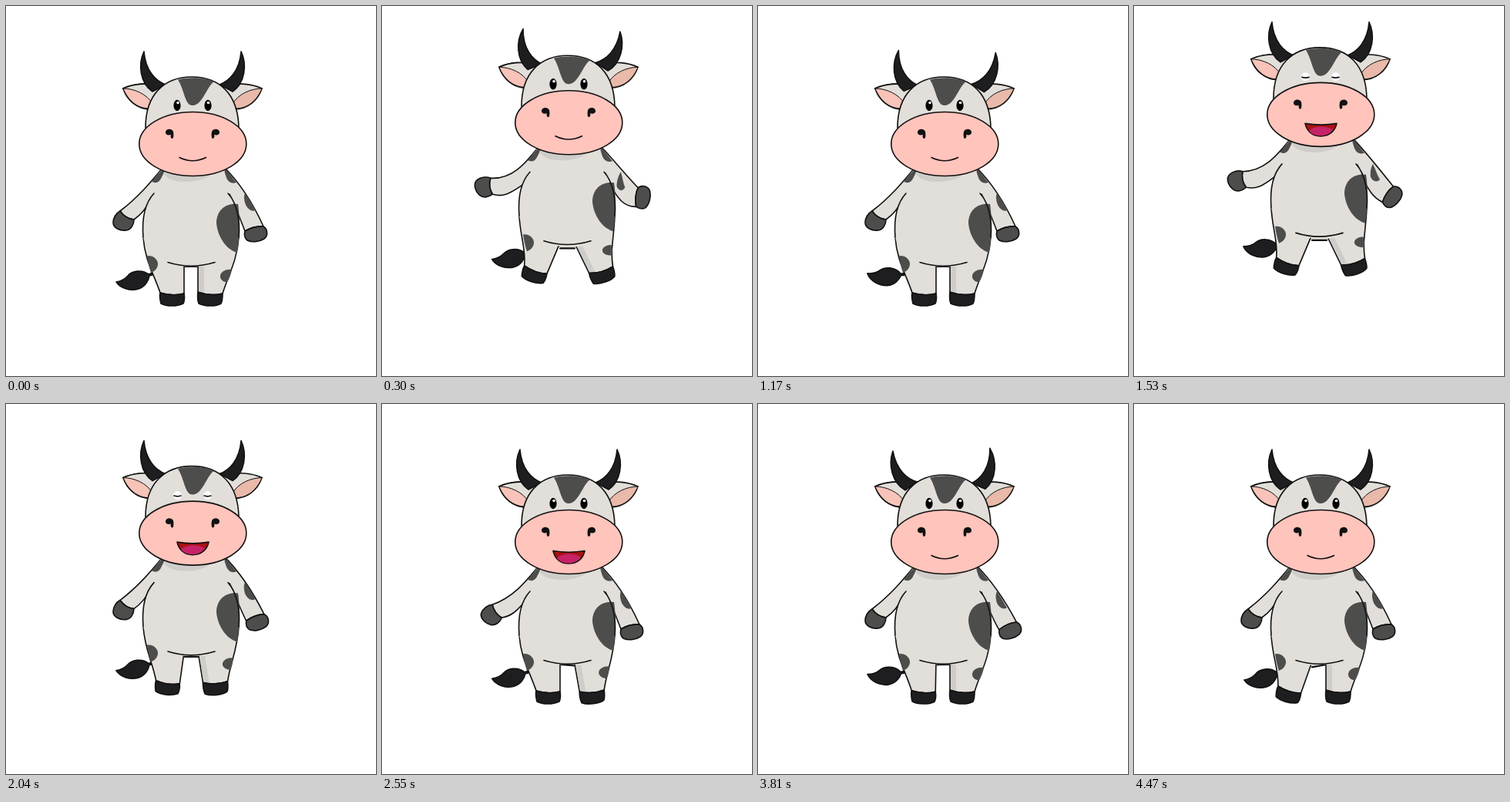
These frames come from a looping animation (480x480 px, 4500 ms). An HTML page:

```html
<!DOCTYPE html>
<html lang="en">
<head>
<meta charset="utf-8">
<title>Happy cow</title>
<style>
html, body { margin: 0; width: 100%; height: 100%; overflow: hidden; background: #fff; }
svg { display: block; width: 100vw; height: 100vh; }
.ln { stroke: #111; stroke-width: 1.6; stroke-linecap: round; stroke-linejoin: round; }
.skin { fill: #e2deda; }
.spot { fill: #4d4d4c; }
.hoof { fill: #1e1e20; }
.pink { fill: #ffc4bb; }
.shade { fill: #cfcdc9; }
.no { fill: none; }
</style>
</head>
<body>
<svg viewBox="0 0 480 480">
  <g id="cow">
    <path id="tail" class="hoof ln" d="M190 346L185 348C176 341 163 344 158 350C154 355 149 357 143 358C149 367 162 370 172 367C181 364 185 356 186 350L190 349Z"/>
    <g id="armL">
      <path class="skin ln" d="M205 208C190 226 172 248 148 266Q155 276 166 277C176 270 180 265 192 244"/>
      <path class="spot ln" d="M148 266C142 269 139 276 139 281C139 288 148 292 156 291C162 290 166 284 166 277Q155 276 148 266Z"/>
    </g>
    <g id="armR">
      <path class="skin ln" d="M282 208C298 224 316 246 334 286Q322 285 310 292C306 282 303 272 290 244"/>
      <path class="spot" d="M310 243C316 251 320 258 324 265C318 268 313 262 311 258C309 253 308 247 310 243Z"/>
      <path class="spot ln" d="M334 286C340 290 340 298 335 302C329 306 319 307 313 304C309 301 309 296 310 292Q322 285 334 286Z"/>
    </g>
    <path id="crotch" class="skin"/>
    <path id="seam" class="ln no" style="stroke-width:2.2"/>
    <g id="legL">
      <path class="skin ln" d="M178 300C180 330 192 348 200 372Q216 377 231 373L231 338"/>
      <path class="hoof ln" d="M200 372Q216 377 231 373C232 379 231 384 230 386C222 390 208 390 201 386C200 382 199 376 200 372Z"/>
    </g>
    <g id="legR">
      <path class="skin ln" d="M302 300C300 330 288 350 281 373Q265 377 249 371L249 338"/>
      <path class="shade" d="M250 338L257 338L257 372L250 371Z"/>
      <path class="spot" d="M293 342C284 341 277 346 278 352C279 356 284 359 287 358Q291 352 293 342Z"/>
      <path class="hoof ln" d="M281 373Q265 377 249 371C248 378 249 383 250 386C258 390 273 390 279 386C281 382 281 377 281 373Z"/>
    </g>
    <path class="skin" d="M208 204L189 229L192 243C180 256 176 275 178 300L186 325L200 338H282L296 325L302 300C304 280 300 256 288 243L299 230L278 204Z"/>
    <path class="shade" d="M203 212Q206 229 236 228Q262 227 272 212Z"/>
    <path class="spot" d="M206 208L189 228Q198 232 202 222Q206 215 206 208ZM283 209L299 229Q290 232 286 223Q283 216 283 209Z"/>
    <path class="spot" d="M183 324C192 323 198 330 197 336C196 342 191 345 188 346C186 340 184 332 183 324ZM301 257C286 255 273 264 273 282C275 302 288 317 300 320C303 305 304 275 301 257Z"/>
    <path class="ln no" d="M192 243C180 256 176 275 178 300M288 243C300 256 304 280 302 300M210 332.5Q240 342 271 332.5"/>
    <g id="ear">
      <path class="skin ln" d="M198 104C182 99 165 101 152 107C157 122 170 134 188 134"/>
      <path class="ln" style="stroke-width:1" d="M152 107C166 107 183 114 190 127L186 133C170 133 158 122 152 107Z"/>
    </g>
    <use href="#ear" fill="#f8c3b8"/>
    <use href="#ear" fill="#e9b9a9" transform="translate(484) scale(-1 1)"/>
    <path id="horn" class="hoof ln" d="M179 59C171 76 174 100 190 111L207 102C194 97 181 84 179 59Z"/>
    <path id="hornR" class="hoof ln" d="M305 59C313 76 310 100 294 111L277 102C290 97 303 84 305 59Z"/>
    <path class="skin ln" d="M181 158C181 115 205 92 241 92C278 92 301 115 302 158"/>
    <path class="spot" d="M223 95.500C235 92 258 92 270 98C260 105 255 129 242 129C232 129 232 110 223 95.500Z"/>
    <g id="open">
      <ellipse cx="222" cy="129" rx="4.6" ry="7.2"/><ellipse cx="262" cy="129" rx="4.6" ry="7.2"/>
      <g fill="#fff"><circle cx="223" cy="125.5" r="1.8"/><circle cx="262.5" cy="125.5" r="1.8"/></g>
    </g>
    <g id="shut">
      <g fill="#fff"><ellipse cx="222.5" cy="130" rx="5.500" ry="5.500"/><ellipse cx="261.500" cy="130" rx="5.500" ry="5.500"/></g>
      <path class="ln no" d="M218 130.500Q222.500 132 227 130.500M257 130.500Q261.500 132 266 130.500"/>
    </g>
    <ellipse class="pink ln" cx="242.3" cy="179" rx="69.5" ry="41.5"/>
    <path id="nostril" fill="#111" d="M207 164C207 159 215 158 217 163C218 168 217 172 216 172C214 172 213 169 214 167C210 168 207 167 207 164Z"/>
    <use href="#nostril" transform="translate(484) scale(-1 1)"/>
    <path id="smile" class="ln no" d="M225 196.500Q242 205 259.500 196.500"/>
    <g id="laugh">
      <path class="ln" fill="#ab1114" d="M222 190.500Q242 194 263 190.500C261 200 254 207 242 207C231 207 224 200 222 190.500Z"/>
      <path fill="#c52268" d="M227 200C234 193 250 193 258 199C253 205 248 206.500 242 206.500C236 206.500 231 205 227 200Z"/>
    </g>
  </g>
</svg>
<script>
const LOOP = 4500, STEP = 30;
const el = id => document.getElementById(id);
const clamp = u => Math.max(0, Math.min(1, u));
const smooth = u => { u = clamp(u); return u * u * (3 - 2 * u); };

// Rises to 1 at the peak, then falls back to 0.
const bump = (t, peak, up, down) => smooth(1 - Math.abs(t - peak) / (t < peak ? up : down));

// A limb turns about its joint; the turn fades in between heights top and end.
function limb(id, x, y, top, end) {
  const paths = [...el(id).children].map(p => [p, p.getAttribute("d")]);
  return deg => {
    const turn = (_, px, py) => {
      const a = deg * Math.PI / 180 * smooth((py - top) / (end - top));
      const c = Math.cos(a), s = Math.sin(a), dx = px - x, dy = py - y;
      return `${(x + dx * c - dy * s).toFixed(2)} ${(y + dx * s + dy * c).toFixed(2)}`;
    };
    for (const [p, d] of paths) p.setAttribute("d", d.replace(/([\d.]+) ([\d.]+)/g, turn));
  };
}

const armL = limb("armL", 160, 251, 232, 266);
const armR = limb("armR", 317, 276, 242, 284);
const legL = limb("legL", 216, 320, 318, 368);
const legR = limb("legR", 268, 314, 316, 368);

function show(id, on) { el(id).style.display = on ? "" : "none"; }
function spin(id, a, x, y) { el(id).setAttribute("transform", `rotate(${a} ${x} ${y})`); }

function draw(t) {
  const hop = bump(t, 455, 385, 385), leap = bump(t, 1715, 475, 455);
  el("cow").setAttribute("transform", `translate(0 ${-43 * hop - 57.5 * leap})`);

  armL(55 * (bump(t, 350, 320, 460) + bump(t, 1635, 405, 415) + bump(t, 2790, 430, 450)));
  armR(-75 * (bump(t, 350, 320, 370) + bump(t, 1700, 365, 410) + .7 * bump(t, 4050, 330, 390)));

  const splay = Math.min(1, 1.7 * (hop + leap));
  const l = splay + 1.15 * bump(t, 4250, 500, 650);
  const r = splay + 1.4 * bump(t, 2900, 530, 600);
  legL(18 * l);
  legR(-19 * r);
  const line = `231 ${338 + 4 * l}L250 ${338 + 4 * r}`;
  el("crotch").setAttribute("d", `M222 330L${line}L258 330`);
  el("seam").setAttribute("d", `M${line}`);

  spin("tail", 14 * Math.sin(Math.PI * t / 2250) ** 2, 188, 348);
  const sway = 5.5 * Math.sin(Math.PI * Math.min(t, 4080) / 510);
  spin("horn", sway, 198, 102);
  spin("hornR", sway, 286, 102);

  const shut = t >= 1260 && t < 2190 || t >= 4320 && t < 4410;
  const laugh = t >= 1260 && t < 3300;
  show("shut", shut);
  show("open", !shut);
  show("laugh", laugh);
  show("smile", !laugh);
}

const start = performance.now();
function tick() {
  const t = (performance.now() - start) % LOOP;
  draw(Math.floor(t / STEP) * STEP);
  requestAnimationFrame(tick);
}
tick();
</script>
</body>
</html>
```
